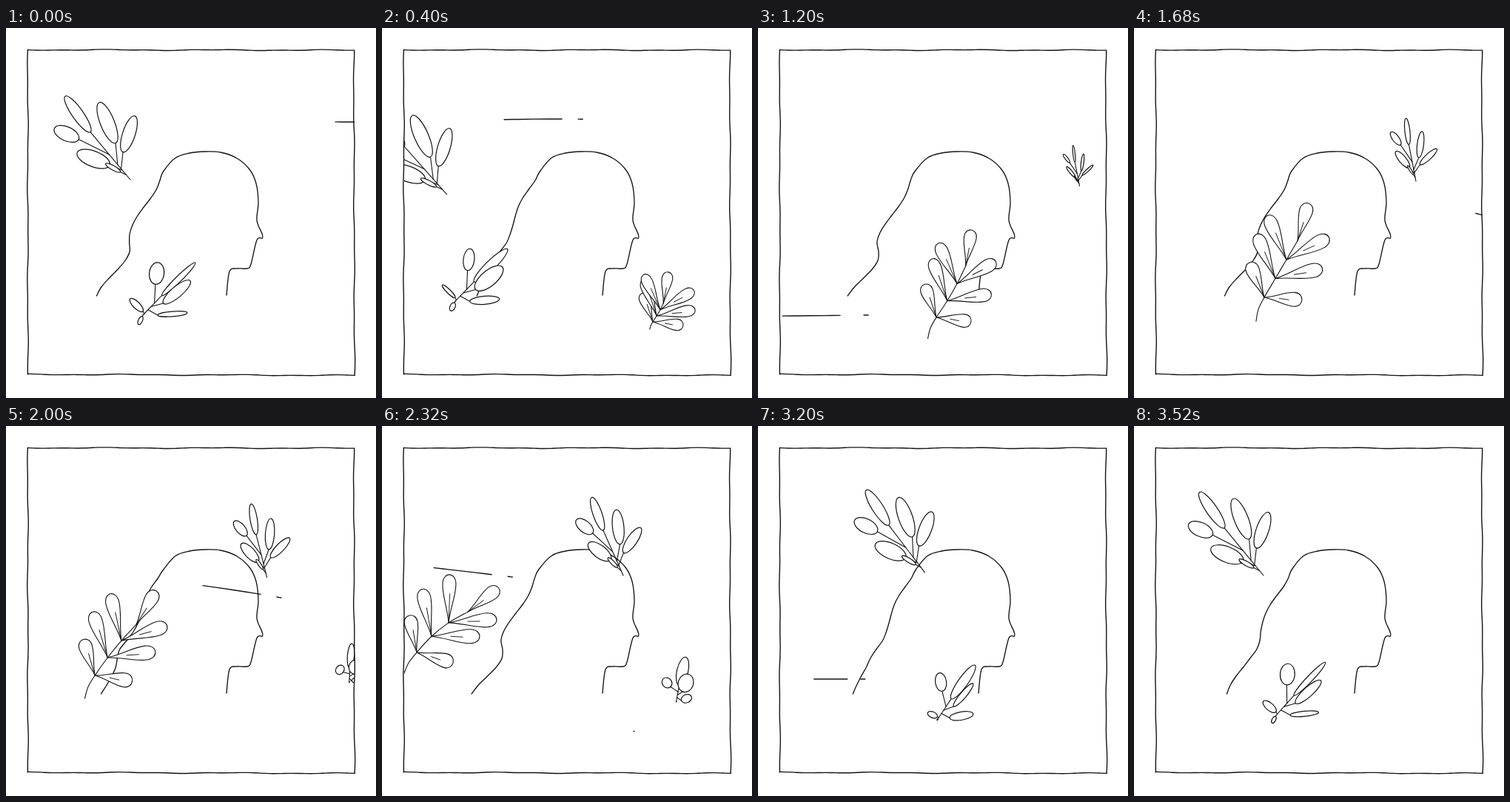
An HTML page with a canvas that plays this animation: 500x500 px, repeating every 3.6 s.

```html
<!DOCTYPE html>
<html lang="en">
<head>
<meta charset="utf-8">
<title>Leaves in the wind</title>
<style>
  html, body { margin: 0; height: 100%; overflow: hidden; background: #fff; }
  canvas { display: block; width: 500px; height: 500px; }
</style>
</head>
<body>
<canvas id="stage" width="500" height="500"></canvas>
<script>
const ctx = document.getElementById('stage').getContext('2d');
const { PI, sin, cos, exp, min, max } = Math;
const LOOP = 3600, STEP = 80, RAD = PI / 180;

const range = n => Array.from({ length: n }, (_, i) => i);
const bump = (y, centre, width) => exp(-(((y - centre) / width) ** 2));
const polar = ([x, y], angle, r) => [x + r * cos(angle * RAD), y + r * sin(angle * RAD)];

// Smooth position on a path of [time, x, y] points, or null outside its time.
function follow(path, t) {
  const last = path.length - 1;
  if (t < path[0][0] || t > path[last][0]) return null;
  let i = 0;
  while (i < last - 1 && t >= path[i + 1][0]) i++;
  const a = path[i], b = path[i + 1], before = path[max(i - 1, 0)], after = path[min(i + 2, last)];
  const d = b[0] - a[0], u = (t - a[0]) / d;
  return [1, 2].map(k => {
    const m0 = (b[k] - before[k]) / (b[0] - before[0]) * d;
    const m1 = (after[k] - a[k]) / (after[0] - a[0]) * d;
    return a[k] + (b[k] - a[k]) * u * u * (3 - 2 * u) + m0 * u * (1 - u) ** 2 - m1 * u * u * (1 - u);
  });
}

function stroke(width) {
  ctx.lineWidth = width;
  ctx.stroke();
}

function curve(pts, width) {
  ctx.beginPath();
  ctx.moveTo(...pts[0]);
  for (let i = 0; i < pts.length - 1; i++) {
    const a = pts[i], b = pts[i + 1], p = pts[i - 1] || a, n = pts[i + 2] || b;
    ctx.bezierCurveTo(a[0] + (b[0] - p[0]) / 6, a[1] + (b[1] - p[1]) / 6,
      b[0] - (n[0] - a[0]) / 6, b[1] - (n[1] - a[1]) / 6, ...b);
  }
  stroke(width);
}

function drawBorder() {
  const corners = [[29.5, 29.5], [470, 30], [471, 469.5], [29.5, 468]];
  corners.forEach(([x, y], side) => {
    const [nx, ny] = corners[(side + 1) % 4];
    curve(range(41).map(i => {
      const u = i / 40, w = .5 * sin(u * 19 + side * 2) + .3 * sin(u * 47 + side);
      return [x + (nx - x) * u + (side % 2 ? w : 0), y + (ny - y) * u + (side % 2 ? 0 : w)];
    }), 1.4);
  });
}

const face = [
  [229, 175.5], [248, 169], [268, 167], [290, 168], [312, 176], [329, 191], [338, 210], [341, 236],
  [339, 260], [346, 278], [346.5, 284], [339, 286.5], [331, 319], [326, 325], [312, 325], [302, 329], [298, 361]
];

// A wave runs down the hair, one wavelength in seven steps.
function hairX(y, k) {
  const middle = 214.5 - (y - 190) * .5235 + 7.5 * bump(y, 322, 24);
  const swing = (3.8 + 4 * bump(y, 300, 18)) * min(1, (y - 185) / 35);
  return middle + swing * cos((k - 2.7 - (y - 250) * 7 / 90) * 2 * PI / 7);
}

function drawHead(t) {
  const n = t / STEP, k = n < 42 ? n : (n - 42) * 3;
  const hair = range(15).map(i => 362 - 12 * i).map(y => [hairX(y, k), y]);
  curve([...hair, ...face], 1.35);
}

function drawPaddle(origin, angle, L, W, veinFrom, veinTo) {
  ctx.save();
  ctx.translate(...origin);
  ctx.rotate(angle * RAD);
  ctx.beginPath();
  ctx.moveTo(0, 0);
  ctx.bezierCurveTo(.3 * L, -.2 * W, .55 * L, -W, .8 * L, -W);
  ctx.bezierCurveTo(1.067 * L, -W, 1.067 * L, W, .8 * L, W);
  ctx.bezierCurveTo(.55 * L, W, .3 * L, .2 * W, 0, 0);
  ctx.fill();
  stroke(1.1);
  ctx.beginPath();
  ctx.moveTo(veinFrom * L, 0);
  ctx.lineTo(veinTo * L, W * .1);
  stroke(.9);
  ctx.restore();
}

const paddlePath = [
  [0, 505, 372], [400, 366, 397], [800, 292, 404], [1200, 241, 391], [1680, 176, 364], [2320, 47, 306], [2800, -140, 250]
];

// Pairs of leaves along a stem that grows, then bends in the wind.
function drawPaddleBranch(t) {
  const root = follow(paddlePath, t);
  if (!root) return;
  const left = max(0, 1680 - t), early = min(1, left / 480), late = max(0, (t - 1680) / 640) ** 1.3;
  const size = 1 - left * .00015, stem = 1 - .32 * (left / 880) ** 2;
  const turn = 3 * early + 12 * late, bend = 12 * late - 5 * early;
  const joints = [root];
  for (let i = 0; i < 3; i++) joints.push(polar(joints[i], turn + bend * i * .75 - 59.5, 29.5 * stem));
  curve([polar(root, turn + 109, 34 * stem), polar(root, turn + 116, 18 * stem), ...joints], 1.1);
  for (let i = 0; i < 3; i++) {
    const length = (i ? 65 : 51) * size, tilt = turn + bend * max(0, i - 1);
    drawPaddle(joints[i], tilt - 113, length, 9 * size, 0, .6);
    drawPaddle(joints[i], tilt + 4 - 16 * i, length, 9.5 * size, .4, .65);
  }
  drawPaddle(joints[3], turn + 2 * bend - 74, 53 * size, 9 * size, 0, .5);
}

// Sprig leaves: base angle, tip angle (from upright), base distance, tip distance, width.
// The first leaf ends the main stem.
const upper = {
  path: [
    [880, 490, 219], [1200, 434.5, 213.5], [1680, 381, 207], [2320, 326, 202], [2800, 285, 195],
    [3520, 175, 202], [3600, 168, 205], [4400, 5, 245]
  ],
  leaves: [
    [-33, -31, 74, 126, 15], [-45, -49, 78, 109, 19], [-48, -56, 30, 71, 21],
    [-15, -15, 47, 99, 19], [-8, 11, 34, 76, 17], [-45, -50, 15, 35, 6]
  ],
  pose(t) {
    const grow = 1.3 * (1 - exp((600 - t) / 1450)), turn = min(22, 11 * exp((2800 - t) / 800) - 11);
    return { angle: a => a + turn, reach: r => r * grow, width: w => w * min(1, grow * grow) };
  }
};
const lower = {
  path: [
    [1760, 515, 325], [2320, 397.5, 373], [2800, 310, 397], [3520, 192, 391], [3600, 185, 388], [4400, 5, 350], [4640, -75, 335]
  ],
  leaves: [
    [44, 45, 37, 100, 20], [60, 54, 32, 79, 21], [22, 16, 45, 74, 20],
    [0, -38, 5, 28, 13], [90, 87, 20, 60, 17], [205, 205, 2, 14, 8]
  ],
  // Unfolds from a short, wide fan while each leaf turns about its own axis.
  pose(t) {
    const u = max(0, (LOOP - t) / 1280), spin = 4.5 * (LOOP - t) / 1280;
    return {
      angle: a => a + .4 * u * (a - 45) - 33 * u,
      reach: (r, tip) => r * max(0, 1 - 38 * u / tip),
      width: (w, i) => w * (.7 + .3 * cos(PI - i * PI / 2 + spin))
    };
  }
};

function drawSprig({ path, leaves, pose }, t) {
  const root = follow(path, t);
  if (!root) return;
  const { angle, reach, width } = pose(t);
  const point = (a, r, tip) => polar(root, angle(a) - 90, reach(r, tip));
  const [axis, , , axisTip] = leaves[0];
  leaves.forEach(([a, , from, to], i) => {
    curve([i ? point(axis, from * .5, axisTip) : root, point(a, from, to)], 1.1);
  });
  leaves.forEach(([a, b, from, to, w], i) => {
    if (reach(to, to) < 2) return;
    const [x0, y0] = point(a, from, to), [x1, y1] = point(b, to, to);
    ctx.beginPath();
    ctx.ellipse((x0 + x1) / 2, (y0 + y1) / 2, Math.hypot(x1 - x0, y1 - y0) / 2,
      min(width(w, i), reach(to, to) / 2) / 2, Math.atan2(y1 - y0, x1 - x0), 0, 2 * PI);
    ctx.fill();
    stroke(1.2);
  });
}

// Gusts: a long stroke followed by a short dash, both running left from x0.
const gusts = [
  { start: -37, x0: 471, speed: .7, dash: 100, y: x => 127 - 4 * sin((471 - x) / 150) ** 2 },
  { start: 800, x0: 341, speed: .77, dash: 110, y: x => 389.5 - x / 100 },
  { start: 1665, x0: 471, speed: .612, dash: 100, y: x => 183.5 + x * .115 + 15 * (x / 471) ** 4 },
  { start: 2319, x0: 341, speed: .796, dash: 213, y: x => 402.5 + 13 * sin(x / 150) },
  { start: 2713, x0: 441, speed: .75, dash: 63, main: 45, y: x => 342 - 11 * max(0, (x - 385) / 55) ** 2 }
];

function drawGust({ start, x0, speed, dash, main = 78, y }, t) {
  if (t < start) return;
  const head = x0 - (t - start) * speed;
  for (const [from, length] of [[0, main], [dash, 6]]) {
    const a = head + from, b = min(a + length, x0);
    if (b > a) curve(range(5).map(i => a + (b - a) * i / 4).map(x => [x, y(x)]), 1.4);
  }
}

function draw() {
  const t = Math.floor(performance.now() % LOOP / STEP) * STEP;
  ctx.fillStyle = '#fff';
  ctx.strokeStyle = '#141414';
  ctx.lineCap = ctx.lineJoin = 'round';
  ctx.fillRect(0, 0, 500, 500);
  drawHead(t);
  ctx.save();
  ctx.beginPath();
  ctx.rect(30, 30, 441, 439);
  ctx.clip();
  gusts.forEach(gust => drawGust(gust, t));
  drawPaddleBranch(t);
  for (const time of [t, t + LOOP]) {
    drawSprig(upper, time);
    drawSprig(lower, time);
  }
  ctx.restore();
  drawBorder();
  requestAnimationFrame(draw);
}
draw();
</script>
</body>
</html>
```
